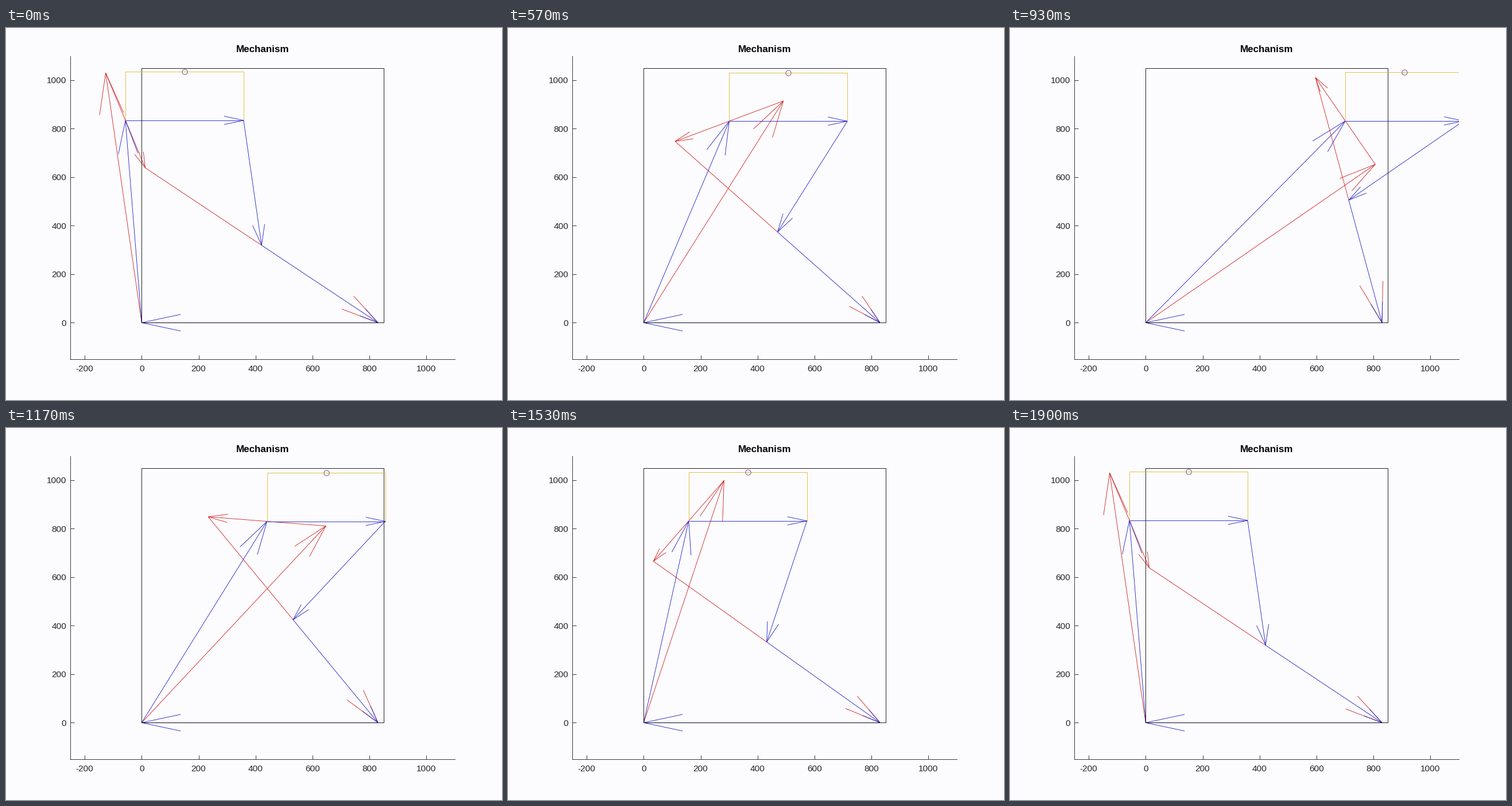
Recreate the animation shown at these times as a matplotlib script. Size 864x648 px, loop 1.93 s.

```python
import numpy as np
import matplotlib.pyplot as plt
from matplotlib.animation import FuncAnimation

W, H = 864, 648
BG, INK = "#fcfcfe", "#262626"
RED, BLUE, GOLD, PURPLE = "#d01c1c", "#1c1cc4", "#e3b52c", "#6f4a80"

# Straight-line linkage with proportions 4 : 5 : 2
GROUND = 830.0
ARM = GROUND * 5 / 4
COUPLER = GROUND / 2
LIFT = 200
START, END, STEPS = 97, 39, 28

TICK_MS, LOOP_MS = 10, 1930
POSES_PER_TICK = 0.3

plt.rcParams["font.family"] = "Liberation Sans"
fig = plt.figure(figsize=(W / 72, H / 72), dpi=72, facecolor=BG)
ax = fig.add_axes([0.13, 0.11, 0.775, 0.815], facecolor=BG)
ax.set(xlim=(-250, 1100), ylim=(-150, 1100),
       xticks=range(-200, 1001, 200), yticks=range(0, 1001, 200))
ax.tick_params(direction="in", length=6.7, width=0.9, color=INK,
               labelbottom=False, labelleft=False)
for side, spine in ax.spines.items():
    spine.set_visible(side in ("left", "bottom"))
    spine.set(linewidth=0.9, edgecolor=INK)


def label(x, y, text, **style):
    """Place text with its baseline at a pixel position from the top left."""
    style = {"ha": "center", "fontsize": 15.43, "color": INK, **style}
    fig.text(x / W, 1 - y / H, text, va="baseline", **style)


def pixel(x, y):
    px, py = ax.transData.transform((x, y))
    return px, H - py


for v in ax.get_xticks():
    label(pixel(v, 0)[0], 598.4, f"{v:.0f}")
for v in ax.get_yticks():
    label(105.2, pixel(0, v)[1] + 5.5, f"{v:.0f}", ha="right")
label(446.6, 42, "Mechanism", fontsize=17, fontweight="bold", color="black")


def line(color, z, **style):
    style = {"lw": 0.85, "solid_capstyle": "butt", **style}
    return ax.plot([], [], color=color, zorder=z, **style)[0]


class Arrow:
    def __init__(self, color, z):
        self.shaft, self.head = line(color, z), line(color, z)

    def set(self, p, q, stop=None):
        """Point from p to q; the shaft may stop short of the tip."""
        d = q - p
        # Head length follows the larger component of the vector
        back = 0.165 * np.abs(d).max() * d / np.hypot(*d)
        side = 0.25 * np.array([-back[1], back[0]])
        self.shaft.set_data(*np.transpose([p, q if stop is None else stop]))
        self.head.set_data(*np.transpose([q - back + side, q, q - back - side]))


O, D = np.zeros(2), np.array([GROUND, 0])
red = [Arrow(RED, 2) for _ in range(3)]
blue = [Arrow(BLUE, 3) for _ in range(5)]
carriage = line(GOLD, 4)
knob = line(PURPLE, 5, marker="o", ms=9.3, mfc="none", mew=0.9)
line("black", 3.5).set_data([0, 850, 850, 0, 0], [0, 0, 1050, 1050, 0])


def joints(theta):
    """Both ends of the coupler for a given crank angle."""
    a = ARM * np.array([np.cos(theta), np.sin(theta)])
    dist = np.hypot(*(D - a))
    e = (D - a) / dist
    along = (COUPLER**2 - ARM**2 + dist**2) / (2 * dist)
    off = np.sqrt(COUPLER**2 - along**2)
    return a, a + along * e - off * np.array([-e[1], e[0]])


def draw(tick):
    k = int((tick + 0.5) * POSES_PER_TICK)
    step = min(k, 2 * STEPS + 1 - k)  # forth, one held pose, back
    a, b = joints(np.radians(START + (END - START) * step / STEPS))
    m = (a + b) / 2
    n = m + (COUPLER, 0)
    c = (b + D) / 2

    red[0].set(O, a)
    red[1].set(a, b)
    red[2].set(b, D, stop=c)  # blue covers the lower half
    for arrow, p, q in zip(blue, (O, m, n, c, D), (m, n, c, D, O)):
        arrow.set(p, q)

    top = m[1] + LIFT
    carriage.set_data([m[0], m[0], n[0], n[0]], [m[1], top, top, n[1]])
    knob.set_data([(m[0] + n[0]) / 2], [top])


anim = FuncAnimation(fig, draw, frames=LOOP_MS // TICK_MS, interval=TICK_MS,
                     repeat=True, repeat_delay=0)
plt.show()
```
